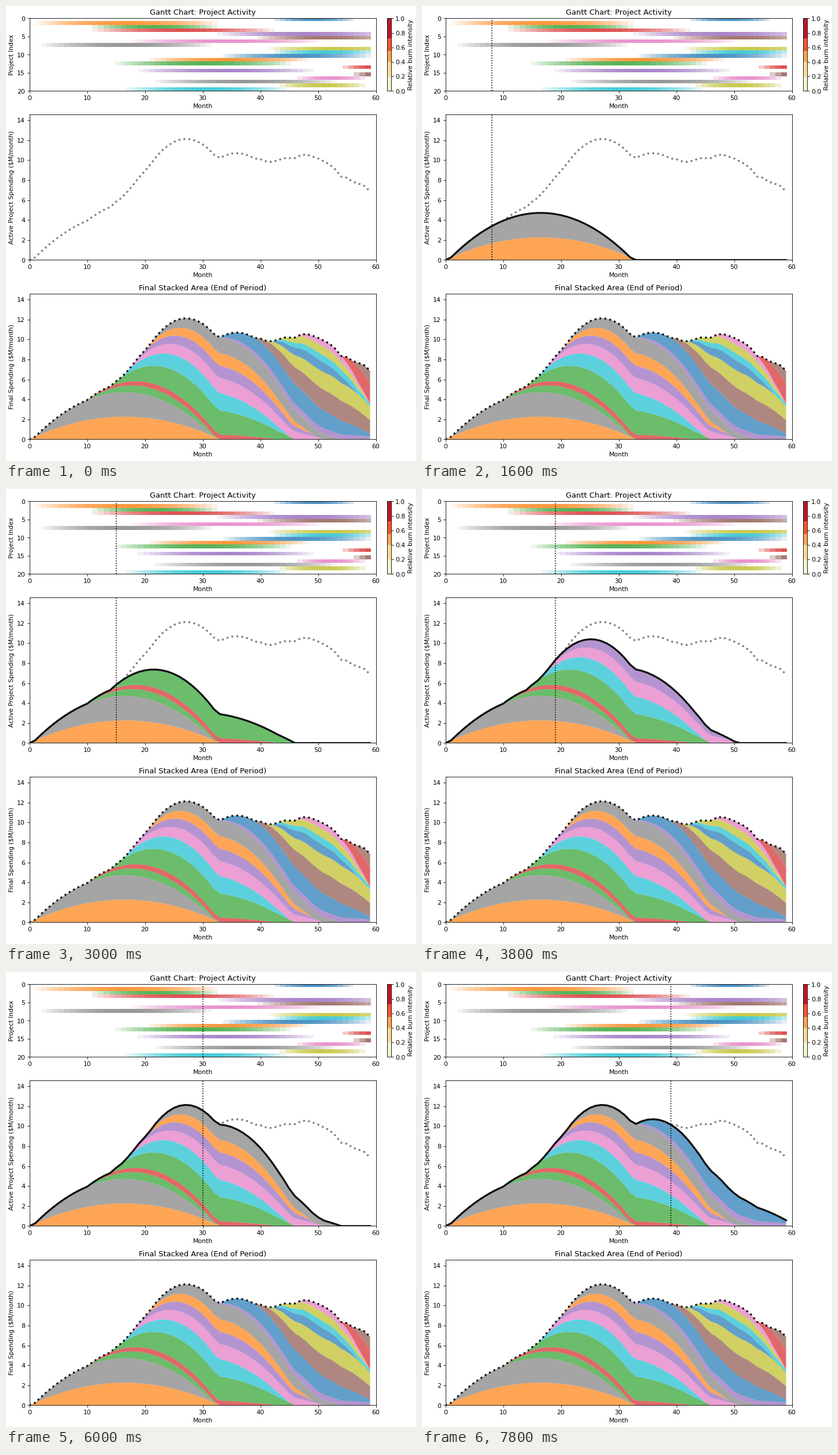
Animation, 710 px wide and 789 px high, one loop 8000 ms. Source, as a matplotlib script:

```python
import numpy as np
import matplotlib.pyplot as plt
from matplotlib.animation import FuncAnimation
from matplotlib.colors import BoundaryNorm, ListedColormap, to_rgb

W, H, DPI = 710, 789, 78
MONTHS = np.arange(60)
FRAMES, STEP = 40, 200
INK = "#111111"

# start month, end month, peak spending in $M/month
PROJECTS = [
    (42, 57, 1.00), (0, 33, 2.27), (10, 33, 0.79), (10, 43, 0.58),
    (32, 64, 0.55), (39, 64, 2.10), (17, 51, 1.50), (1, 32, 2.45),
    (41, 65, 1.80), (42, 61, 0.70), (33, 60, 2.00), (20, 49, 1.26),
    (14, 46, 2.49), (54, 67, 2.10), (18, 50, 1.24), (56, 76, 2.65),
    (46, 59, 0.65), (21, 54, 1.66), (43, 59, 0.90), (16, 45, 1.80),
]
COLORS = [f"C{i % 10}" for i in range(len(PROJECTS))]


def burn(start, end, peak):
    """Parabolic spending between start and end."""
    p = (MONTHS - start) / (end - start)
    return np.clip(4 * peak * p * (1 - p), 0, None)


spend = np.array([burn(*p) for p in PROJECTS])
total = spend.sum(axis=0)
order = sorted(range(len(PROJECTS)), key=lambda i: PROJECTS[i][0])

fig = plt.figure(figsize=((W + 1e-4) / DPI, (H + 1e-4) / DPI), dpi=DPI,
                 facecolor="white")


def panel(left, top, right, bottom):
    return fig.add_axes([left / W, 1 - bottom / H,
                         (right - left) / W, (bottom - top) / H])


def stack(ax, ids):
    return ax.stackplot(MONTHS, spend[ids], colors=[COLORS[i] for i in ids],
                        alpha=0.7, linewidth=0)


gantt = panel(40.5, 21.5, 640.5, 147.5)
active = panel(40.5, 188.5, 640.5, 440.5)
final = panel(40.5, 499.5, 640.5, 751.5)
bar = panel(660, 21.5, 666.5, 147.5)

# Activity rows: opacity follows each project's relative spending
cells = np.zeros(spend.shape + (4,))
cells[..., :3] = np.array([to_rgb(c) for c in COLORS])[:, None]
cells[..., 3] = 0.8 * spend / spend.max(axis=1, keepdims=True)
gantt.imshow(cells, extent=[0, 59, 20, 0], aspect="auto",
             interpolation="nearest")
gantt.set(xlim=(0, 60), ylim=(20, 0), yticks=range(0, 21, 5),
          xlabel="Month", ylabel="Project Index",
          title="Gantt Chart: Project Activity")

for ax, name in ((active, "Active Project"), (final, "Final")):
    ax.set(xlim=(0, 60), ylim=(0, total.max() * 1.2), yticks=range(0, 15, 2),
           xlabel="Month", ylabel=name + r" Spending (\$M/month)")

active.plot(MONTHS, total, ":", color="gray", lw=3)
stack(final, order)
final.plot(MONTHS, total, ":", color=INK, lw=3)
final.set_title("Final Stacked Area (End of Period)")

edges = [0, 0.2, 0.4, 0.55, 0.73, 1]
shades = ListedColormap(["#f4f3d3", "#fbdc94", "#fda650", "#f1562f", "#bf1527"])
scale = plt.cm.ScalarMappable(BoundaryNorm(edges, shades.N), shades)
cbar = fig.colorbar(scale, cax=bar, spacing="proportional", drawedges=False,
                    label="Relative burn intensity")
cbar.set_ticks(np.arange(6) / 5, labels=[f"{k / 5:.1f}" for k in range(6)])
bar.tick_params(which="minor", length=0)

outline, = active.plot([], [], color=INK, lw=3, zorder=3 - 0.6)
cursors = [ax.axvline(0, color="black", ls=":", lw=1.5, zorder=2.45)
           for ax in (gantt, active)]
areas = []


def update(month):
    while areas:
        areas.pop().remove()
    begun = [i for i in order if PROJECTS[i][0] < month]
    if begun:
        areas.extend(stack(active, begun))
        outline.set_data(MONTHS, spend[begun].sum(axis=0))
    else:
        outline.set_data([], [])
    active.set_xlim(0, 60)
    active.set_ylim(0, total.max() * 1.2)
    for line in cursors:
        line.set_xdata([month, month])
    return [outline, *cursors, *areas]


anim = FuncAnimation(fig, update, frames=FRAMES, interval=STEP,
                     init_func=lambda: update(0), repeat=True,
                     repeat_delay=0, blit=False)
plt.show()
```
